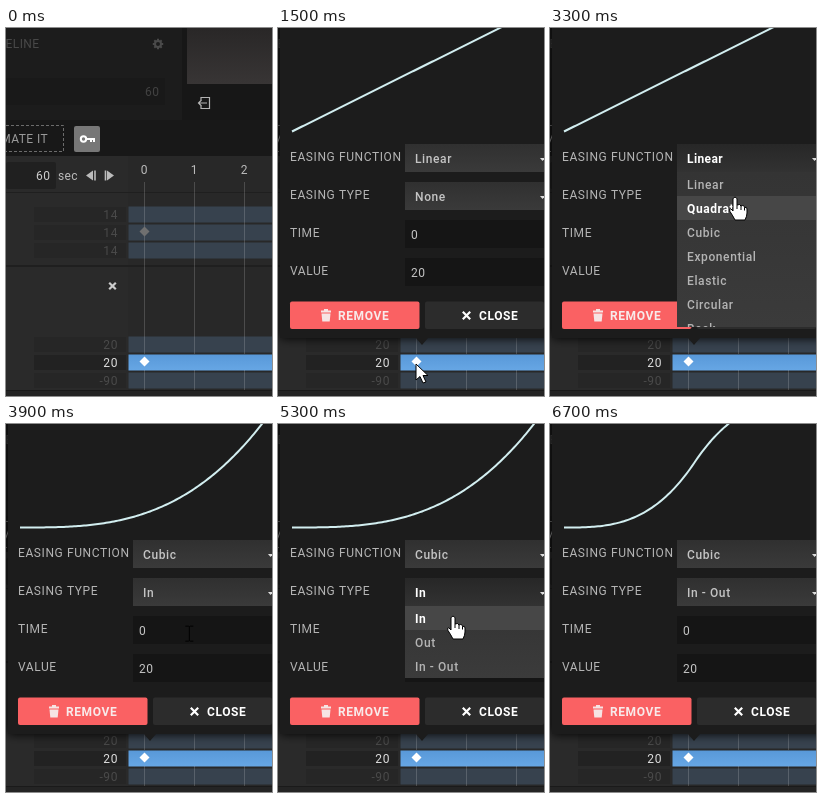
An HTML page with a canvas that plays this animation: 266 px wide and 368 px high, repeating every 7100 ms.

```html
<!DOCTYPE html>
<html lang="en">
<head>
<meta charset="utf-8">
<title>Keyframe easing editor</title>
<style>
html, body { margin: 0; width: 100%; height: 100%; overflow: hidden; background: #1c1c1c; }
canvas { display: block; }
</style>
</head>
<body>
<canvas id="stage" width="266" height="368"></canvas>
<script>
const ctx = document.getElementById('stage').getContext('2d');
const LOOP = 7100, STEP = 100;

// Pointer path: time, x, y
const PATH = [
  [0, 200, 372], [200, 200, 372], [800, 142, 338], [900, 138, 336], [2000, 138, 336],
  [2600, 190, 141], [2900, 190, 141], [3300, 185, 169], [3600, 183, 200], [3800, 183, 200],
  [4400, 185, 258], [4700, 180, 168], [4900, 180, 168], [5300, 175, 192], [5600, 171, 220],
  [5800, 170, 227], [6000, 172, 240], [6100, 172, 240], [6400, 205, 292], [6700, 262, 375],
  [LOOP, 262, 375]
];
const FUNCTIONS = ['Linear', 'Quadratic', 'Cubic', 'Exponential', 'Elastic', 'Circular', 'Back'];
const TYPES = ['In', 'Out', 'In - Out'];
const EASE = {
  None: u => u,
  In: u => u ** 3,
  'In - Out': u => u < .5 ? 4 * u ** 3 : 1 - 4 * (1 - u) ** 3
};
const ARROW = new Path2D('M0 0V16L4 12.5L7 19L10 18L7 11.5H12Z');
const HAND = new Path2D('M-2 1.5Q0-1.5 2 1.5V8Q5 6.5 6 9Q9 7.5 9.5 10.5Q12 9.5 12 12V16Q12 19 10 23H0Q-2 19-5 14.5Q-6 11-4 12L-2 14Z');
const BEAM = new Path2D('M-4-7.5H-1L0-7L1-7.5H4M0-7V7M-4 7.5H-1L0 7L1 7.5H4');

function rect(x, y, w, h, color, radius = 0) {
  ctx.fillStyle = color;
  ctx.beginPath();
  ctx.roundRect(x, y, w, h, radius);
  ctx.fill();
}

function text(str, x, y, color, weight = 400, align = 'left', spacing = 0.6) {
  ctx.font = `${weight} 12px Roboto, sans-serif`;
  ctx.letterSpacing = spacing + 'px';
  ctx.textAlign = align;
  ctx.fillStyle = color;
  ctx.fillText(str, x, y + 4);
}

function line(d, color, width = 1) {
  ctx.strokeStyle = color;
  ctx.lineWidth = width;
  ctx.stroke(new Path2D(d));
}

function shape(d, color) {
  ctx.fillStyle = color;
  ctx.fill(new Path2D(d));
}

function gradient(y, h, top, bottom) {
  const g = ctx.createLinearGradient(0, y, 0, y + h);
  g.addColorStop(0, top);
  g.addColorStop(1, bottom);
  return g;
}

function cross(x, y, r, color) {
  line(`M${x - r} ${y - r}l${2 * r} ${2 * r}m0 ${-2 * r}l${-2 * r} ${2 * r}`, color, 2.2);
}

function diamond(y, color) {
  shape(`M138.5 ${y - 5}l5 5l-5 5l-5-5z`, color);
}

function gear(x, y) {
  const color = '#4a4a4a';
  for (let i = 0; i < 8; i++) {
    const a = i * Math.PI / 4, c = Math.cos(a), s = Math.sin(a);
    line(`M${x + 3 * c} ${y + 3 * s}L${x + 5.2 * c} ${y + 5.2 * s}`, color, 2);
  }
  ctx.beginPath();
  ctx.arc(x, y, 3, 0, 7);
  ctx.stroke();
}

function drawTimeline() {
  rect(0, 0, 266, 368, '#1c1c1c');
  text('ELINE', 33.5, 16, '#484848', 400, 'right', 0.4);
  gear(152, 16);
  rect(0, 50, 159, 27, '#191919');
  text('60', 139, 64, '#424242', 400, 'left', 0.4);
  rect(176, 0, 90, 93, '#171717');
  rect(181, 0, 85, 56, gradient(0, 56, '#292727', '#383535'));
  line('M195 72V69.5H203.5V80.5H195V78M201 75H192.5M195.5 72L192.5 75L195.5 78', '#b4b4b4', 1.2);

  rect(0, 92, 266, 36, '#181818');
  ctx.setLineDash([3, 2]);
  line('M0 97.5H57.5V123.5H0', '#6c6c6c');
  ctx.setLineDash([]);
  text('MATE IT', 42, 111, '#999', 400, 'right', 0.4);
  rect(68, 98, 26, 26, '#777', 2);
  line('M80 111H88V114M85 111V114', '#fff', 2);
  ctx.beginPath();
  ctx.arc(77.5, 111, 2.7, 0, 7);
  ctx.stroke();

  rect(0, 128, 122, 240, '#2a2a2a');
  rect(122, 128, 144, 240, '#282828');
  rect(0, 134, 50, 27, '#202020', 2);
  text('60', 30, 148, '#ccc');
  text('sec', 52, 148, '#bbb', 400, 'left', 0.4);
  shape('M87 142.5v10l-7-5zM101 142.5v10l7-5z', '#bbb');
  line('M89 142.5v10M99.5 142.5v10', '#bbb', 1.6);
  rect(0, 164, 266, 1, '#1f1f1f');
  rect(0, 237, 266, 2, '#1f1f1f');
  cross(106.5, 258, 3.3, '#ccc');

  const rows = [[178, '14'], [196, '14'], [214, '14'], [308, '20'], [326, '20'], [344, '-90']];
  for (const [y, value] of rows) {
    const active = y === 326;
    rect(28, y + 1, 92, 15, active ? '#222' : '#262626');
    text(value, 112, y + 8.5, active ? '#ddd' : '#4a4a4a', 400, 'right');
    rect(122.5, y + .5, 143.5, 16, active ? gradient(y, 16, '#5898d8', '#66a6e4') : '#37424e');
  }
  [138, 188, 238].forEach((x, i) => {
    text(i, x + .5, 142, '#bbb', 400, 'center');
    rect(x, 154, 1, 172, 'rgba(255,255,255,.17)');
    rect(x, 342, 1, 20, 'rgba(255,255,255,.17)');
  });
  rect(0, 362, 266, 6, '#242424');
  rect(0, 362, 266, 1, '#1a1a1a');
  diamond(203.5, '#707070');
  diamond(333.5, '#fff');
}

function drawCurve(ease) {
  ctx.beginPath();
  for (let x = 0; x <= 261; x += 2) ctx.lineTo(14 + x, 103.5 - 130 * ease(x / 261));
  ctx.strokeStyle = '#d2eef0';
  ctx.lineWidth = 2;
  ctx.stroke();
}

function drawSelect(y, value, open) {
  rect(127, y, 139, 28, open ? gradient(y, 28, '#272727', '#323232') : gradient(y, 28, '#303030', '#3a3a3a'));
  text(value, 137, y + 15, open ? '#fff' : '#c4c4c4', open ? 700 : 500, 'left', open ? 0.4 : 0.6);
  shape(`M262 ${y + 14}h5l-2.5 3z`, '#ddd');
}

function drawList(items, top, height, pointerY) {
  ctx.save();
  ctx.beginPath();
  ctx.rect(127, top, 139, height);
  ctx.clip();
  rect(127, top, 139, height, gradient(top, height, '#343434', '#3b3b3b'));
  const hover = Math.floor((pointerY - top) / 24);
  items.forEach((item, i) => {
    const y = top + 24 * i, on = i === hover;
    if (on) rect(127, y, 139, 24, '#474747');
    text(item, 137, y + 13, on ? '#fff' : '#b4b4b4', on ? 700 : 500);
  });
  ctx.restore();
}

function drawPopup(t, x, y, openList) {
  const picked = t >= 3900;
  const type = t >= 6100 ? 'In - Out' : picked ? 'In' : 'None';
  ctx.save();
  ctx.globalAlpha = Math.min(1, (t - 1000) / 400);
  ctx.shadowColor = '#000';
  ctx.shadowBlur = 10;
  rect(2, -20, 290, 330, '#1c1c1c');
  ctx.shadowBlur = 0;
  shape('M138 310h12l-6 7z', '#1c1c1c');
  drawCurve(EASE[type]);

  ['EASING FUNCTION', 'EASING TYPE', 'TIME', 'VALUE'].forEach((label, i) =>
    text(label, 12, 129 + 38 * i, '#b4b4b4'));
  drawSelect(116, picked ? 'Cubic' : 'Linear', openList === FUNCTIONS);
  drawSelect(154, type, openList === TYPES);
  rect(127, 192, 139, 28, '#151515');
  rect(127, 230, 139, 28, '#151515');
  text('0', 133, 207, '#c4c4c4');
  text('20', 133, 245, '#c4c4c4');

  const overButtons = y >= 273 && y < 301;
  rect(12, 273.5, 129.5, 27.5, overButtons && x < 142 ? '#ff7070' : '#fa6163', 2);
  shape('M43 282.5h10v2h-10zM46 281h4v2h-4zM43.5 285.5h9l-.8 8h-7.4z', '#f6e4e4');
  text('REMOVE', 60, 288, '#f8eaea', 700);
  rect(147, 273.5, 119, 27.5, overButtons && x >= 147 ? '#3c3c3c' : '#2c2c2c', 2);
  cross(188.5, 287.5, 3.7, '#fff');
  text('CLOSE', 201, 288, '#fff', 700);

  if (openList === FUNCTIONS) drawList(FUNCTIONS, 144, 155, y);
  if (openList === TYPES) drawList(TYPES, 182, 72, y);
  ctx.restore();
}

function pointerAt(t) {
  const i = PATH.findIndex(p => p[0] > t);
  const [t0, x0, y0] = PATH[i - 1], [t1, x1, y1] = PATH[i];
  const k = (t - t0) / (t1 - t0);
  return [x0 + (x1 - x0) * k, y0 + (y1 - y0) * k];
}

function drawPointer(x, y, popup, openList) {
  const inside = (top, bottom) => y >= top && y < bottom;
  const overField = inside(192, 220) || inside(230, 259);
  const overControl = openList || inside(116, 144) || inside(154, 182) || inside(273, 301);
  ctx.save();
  ctx.translate(x, y);
  ctx.lineWidth = 1;
  ctx.strokeStyle = '#000';
  ctx.fillStyle = '#fff';
  if (popup && overField && !openList) {
    ctx.stroke(BEAM);
  } else {
    const icon = popup && overControl ? HAND : ARROW;
    ctx.fill(icon);
    ctx.stroke(icon);
    if (icon === HAND) line('M2 8v4M6 9v4M9.5 10.5v3', '#000');
  }
  ctx.restore();
}

function draw(now) {
  const t = Math.floor(now % LOOP / STEP) * STEP;
  const [x, y] = pointerAt(t);
  const popup = t > 1000;
  const openList = t >= 2600 && t < 3900 ? FUNCTIONS : t >= 5000 && t < 6100 ? TYPES : null;
  drawTimeline();
  if (popup) drawPopup(t, x, y, openList);
  drawPointer(x, y, popup, openList);
}

const start = performance.now();
function tick() {
  draw(performance.now() - start);
  requestAnimationFrame(tick);
}
tick();
</script>
</body>
</html>
```
